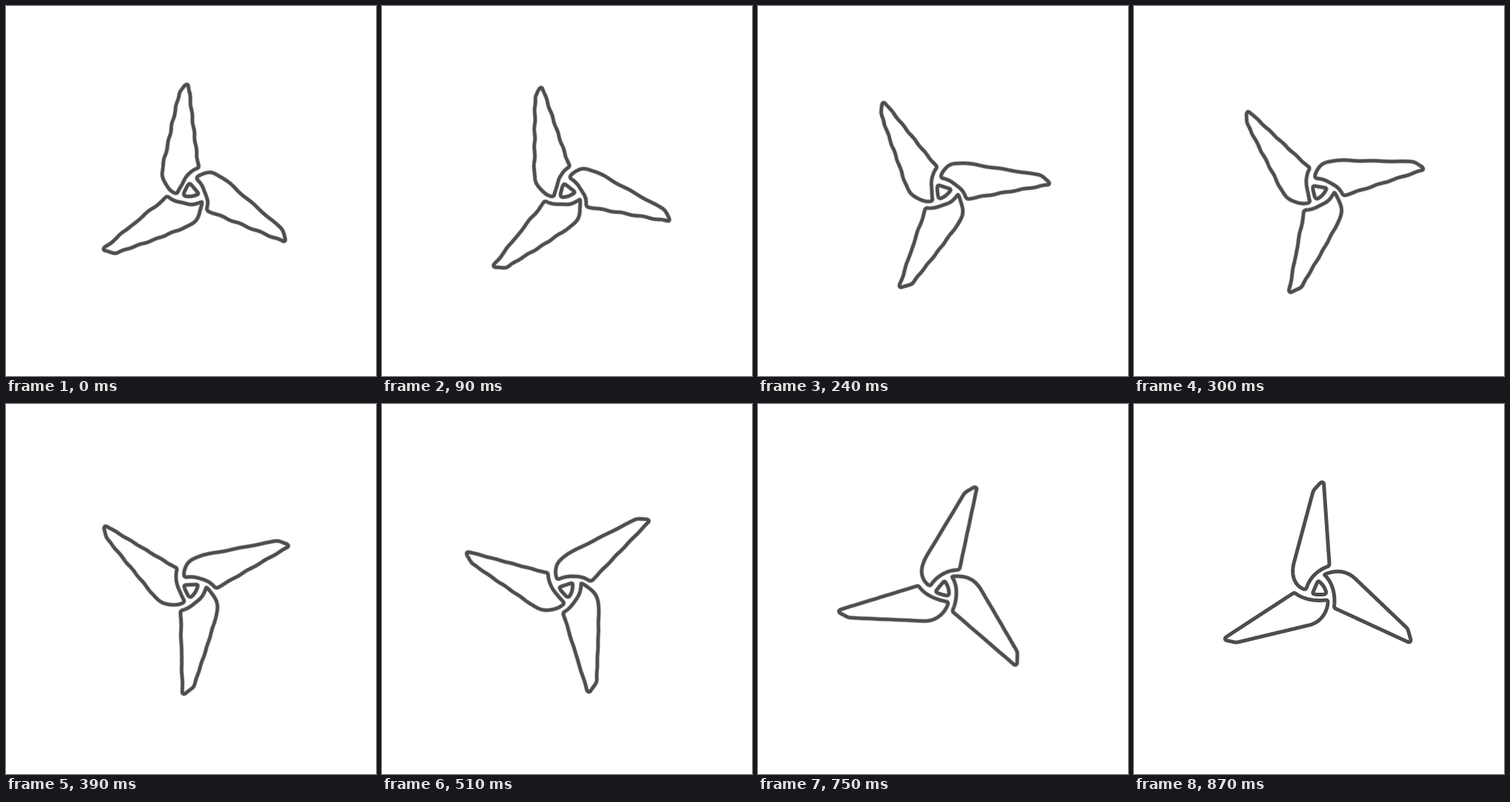
Recreate the animation shown at these times as an HTML page. Size 500 by 500 pixels, loop 0.9 s.

```html
<!DOCTYPE html>
<html lang="en">
<head>
<meta charset="utf-8">
<title>Spinning rotor</title>
<style>
  html, body { margin: 0; width: 100%; height: 100%; overflow: hidden; background: #fff; }
  svg { display: block; width: 100vw; height: 100vh; }
  path { fill: none; stroke: #4d4d4f; stroke-width: 5; stroke-linejoin: round; }
</style>
</head>
<body>
<svg viewBox="0 0 500 500">
  <g id="rotor">
    <path class="blade" d="M256.5 107.5L264 216Q264 219 261 220C247 225 237 236 233 249Q232 251 229 250C217 245 212 232 216 215L241 122Q242 117 245 114L252 106.5Q255.5 104.5 256.5 107.5Z"/>
    <path class="blade" d="M258.5 232C267.5 241 272.5 256 270.5 273Q270.5 276 273.5 277L370 321.5Q374 322.5 374 318.5L370.5 306Q369.5 303 366 300L300 237C288.5 225.5 273.5 223.5 258.5 230Q256.5 231 258.5 232Z"/>
    <path class="blade" d="M219 256.5C230 264.5 246 266.5 259 265Q262 264.5 262 268C261 282.5 252 294.5 238 298.5L142 321.5Q138 322.5 134 321.5L125 319.5Q121 317.5 125 314.5L214 256.5Q216 254.5 219 256.5Z"/>
    <path d="M247.7 241Q249 238.5 251 240.5Q257 245.5 259.5 253.5Q260 256.5 257 257.2Q250 258 244 257Q241 256.5 242 254Z"/>
  </g>
</svg>
<script>
  const LOOP = 900, STEPS = 30, TURN = 120, WOBBLE = 0.6, BLUR = 0.6;
  const rotor = document.getElementById('rotor');

  const samplePath = (path) => {
    const length = path.getTotalLength();
    const count = Math.round(length / 1.5);
    return Array.from({ length: count }, (_, i) => path.getPointAtLength(length * i / count));
  };

  const blades = [...rotor.querySelectorAll('.blade')].map((path) => ({ path, points: samplePath(path) }));

  // Hand-drawn unevenness, fixed to the rotor
  const wobble = ({ x, y }, amount) => {
    const dx = amount * Math.sin(0.17 * x + 0.21 * y);
    const dy = amount * Math.sin(0.23 * x - 0.13 * y + 1);
    return (x + dx).toFixed(2) + ' ' + (y + dy).toFixed(2);
  };

  let shown = -1;

  function draw(now) {
    const step = Math.floor((now % LOOP) / LOOP * STEPS);
    if (step === shown) return;
    shown = step;
    const left = STEPS - 1 - step;
    const roughness = left / (STEPS - 1);
    rotor.setAttribute('transform', `rotate(${left * TURN / STEPS} 250 250)`);
    rotor.style.filter = left ? `blur(${BLUR * roughness}px)` : 'none';
    for (const { path, points } of blades) {
      path.setAttribute('d', 'M' + points.map((p) => wobble(p, WOBBLE * roughness)).join('L') + 'Z');
    }
  }

  const start = performance.now();
  function tick() {
    draw(performance.now() - start);
    requestAnimationFrame(tick);
  }
  tick();
</script>
</body>
</html>
```
